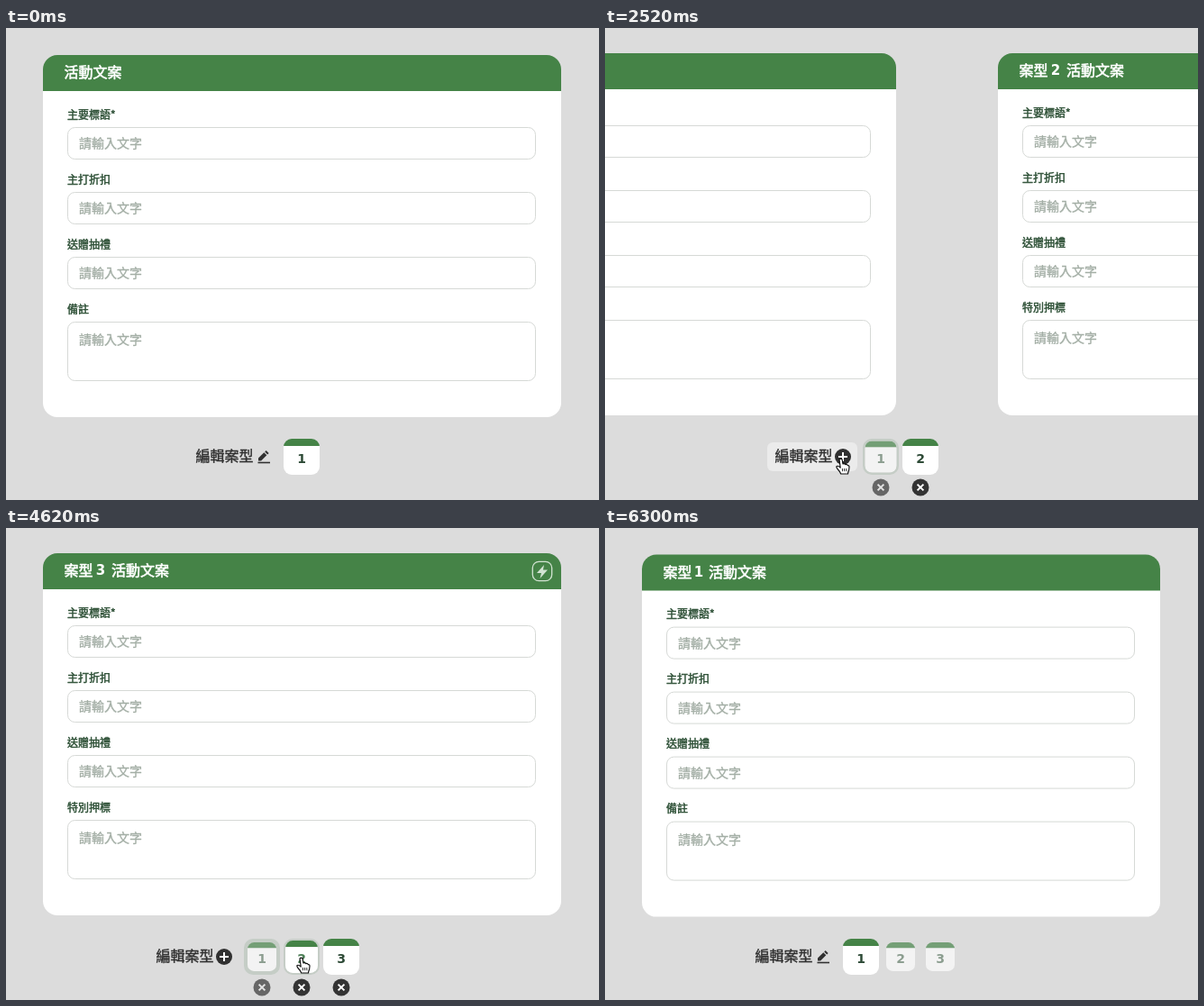
An HTML page with a canvas for the animation above (6370 ms loop, 658x524 px).

```html
<!DOCTYPE html>
<html lang="zh-Hant">
<head>
<meta charset="utf-8">
<title>活動文案</title>
<style>
html, body { margin: 0; width: 100%; height: 100%; overflow: hidden; background: #dcdcdc; }
canvas { display: block; width: 658px; height: 524px; }
</style>
</head>
<body>
<canvas id="stage"></canvas>
<script>
const W = 658, H = 524, LOOP = 6370, STEP = 70;
const BACK = '#dcdcdc', GREEN = '#458347', DARK = '#303030', INK = '#2c4f35';
const CJK = '"Noto Sans CJK TC", "Noto Sans CJK", "Noto Sans CJK JP", sans-serif';
const NUM = '"DejaVu Sans", sans-serif';
const EDIT_ON = 1260, EDIT_OFF = 4680;

const canvas = document.getElementById('stage');
const ctx = canvas.getContext('2d');
const dpr = window.devicePixelRatio || 1;
canvas.width = W * dpr;
canvas.height = H * dpr;

// cubic-bezier(.25, .1, .25, 1)
function ease(x) {
  if (x <= 0) return 0;
  if (x >= 1) return 1;
  const curve = (a, b, u) => 3 * a * u * (1 - u) ** 2 + 3 * b * u * u * (1 - u) + u ** 3;
  let lo = 0, hi = 1;
  for (let i = 0; i < 24; i++) {
    const mid = (lo + hi) / 2;
    if (curve(.25, .25, mid) < x) lo = mid; else hi = mid;
  }
  return curve(.1, 1, lo);
}

// keys: [start, value, duration]
function track(t, first, keys) {
  let v = first;
  for (const [start, to, dur] of keys) {
    if (t >= start) v += (to - v) * ease((t - start) / dur);
  }
  return v;
}

function last(t, first, keys) {
  let v = first;
  for (const [start, to] of keys) if (t >= start) v = to;
  return v;
}

const SLIDE = [[2445, 1, 291], [3565, 2, 291], [4675, 1.0015, 291], [5665, 0, 291]];
const CARD_Y = [[EDIT_ON, 28, 200], [6160, 30, 280]];
const COUNT = [[2450, 2], [3570, 3]];

// tile emphasis: 0 idle, .5 hovered, 1 active
const TILES = [
  [[2450, 0, 200], [5230, .5, 80], [5670, 1, 200]],
  [[3570, 0, 140], [4340, .5, 140], [4680, 1, 200], [5670, 0, 200]],
  [[4680, 0, 200]]
];

const CURSOR = [
  [420, 269, 459, 140], [630, 255, 483, 140], [1400, 262, 479, 420], [3080, 249, 480, 140],
  [3860, 328, 478, 480], [4900, 295, 481, 420], [6020, 298, 491, 210]
];
const CLICKS = [1050, 2240, 3360, 4480, 5460];

function box(x, y, w, h, r) {
  ctx.beginPath();
  ctx.roundRect(x, y, w, h, r);
}

function panel(x, y, w, h, r, color) {
  ctx.fillStyle = color;
  box(x, y, w, h, r);
  ctx.fill();
}

function disc(x, y, r, color) {
  ctx.fillStyle = color;
  ctx.beginPath();
  ctx.arc(x, y, r, 0, 7);
  ctx.fill();
}

function poly(points, color) {
  ctx.fillStyle = color;
  ctx.beginPath();
  points.forEach(p => ctx.lineTo(...p));
  ctx.closePath();
  ctx.fill();
}

function line(x1, y1, x2, y2, width, color) {
  ctx.strokeStyle = color;
  ctx.lineWidth = width;
  ctx.beginPath();
  ctx.moveTo(x1, y1);
  ctx.lineTo(x2, y2);
  ctx.stroke();
}

// y is the middle of the glyphs; a hairline stroke makes a medium weight
function text(str, x, y, size, color, bold = .025) {
  const base = Math.round(y + size * .38);
  ctx.font = `400 ${size}px ${CJK}`;
  ctx.textAlign = 'left';
  ctx.lineJoin = 'round';
  ctx.fillStyle = ctx.strokeStyle = color;
  ctx.lineWidth = size * bold;
  ctx.fillText(str, x, base);
  ctx.strokeText(str, x, base);
}

function digit(n, x, y, size, color) {
  ctx.font = `700 ${size}px ${NUM}`;
  ctx.textAlign = 'center';
  ctx.fillStyle = color;
  ctx.fillText(n, x, Math.round(y + size * .365));
}

function bolt(x, y) {
  ctx.strokeStyle = '#d3e4d3';
  ctx.lineWidth = 1.3;
  box(x - 10.7, y - 10.7, 21.4, 21.4, 7);
  ctx.stroke();
  const shape = [[2, -7], [-6, 2], [-1, 2], [-2.5, 8], [6, -1.5], [1, -1.5]];
  poly(shape.map(([a, b]) => [x + a, y + b]), '#d3e4d3');
}

function card(i, x, y, numbered) {
  if (x > W || x < -580) return;
  panel(x, y + 20, 575, 382, [0, 0, 16, 16], '#fff');
  panel(x, y, 575, 40, [16, 16, 0, 0], GREEN);

  const tx = x + 23.5, ty = y + 19;
  if (numbered) {
    text('案型', tx, ty, 16, '#fff', .04);
    digit(i + 1, tx + (i ? 40.5 : 39.5), ty, 15, '#fff');
    text('活動文案', tx + (i ? 52.5 : 50.5), ty, 16, '#fff', .04);
  } else {
    text('活動文案', tx, ty, 16, '#fff', .04);
  }
  if (i) bolt(x + 554, y + 20);

  const names = ['主要標語*', '主打折扣', '送贈抽禮', i ? '特別押標' : '備註'];
  names.forEach((name, k) => {
    const top = y + 80 + 72 * k, tall = k === 3;
    text(name, x + 27, top - 14, 12, INK, .04);
    ctx.strokeStyle = '#d6d9d6';
    ctx.lineWidth = 1;
    box(x + 27.5, top + .5, 519, tall ? 65 : 35, 8);
    ctx.stroke();
    text('請輸入文字', x + 40, top + (tall ? 20 : 18), 14, '#a3aea5');
  });
}

function pencil(x, y) {
  poly([[x - 6, y + 1.5], [x + .3, y - 4.7], [x + 3.3, y - 1.7], [x - 2.9, y + 4.5], [x - 6, y + 4.5]], DARK);
  poly([[x + 1.2, y - 5.6], [x + 2.6, y - 7], [x + 5.6, y - 4], [x + 4.2, y - 2.6]], DARK);
  line(x - 6.5, y + 6.5, x + 7, y + 6.5, 1.6, DARK);
}

function plus(x, y) {
  disc(x, y, 9, DARK);
  line(x - 5, y, x + 5, y, 2, '#fff');
  line(x, y - 5, x, y + 5, 2, '#fff');
}

function closeMark(x, y, strong, alpha) {
  ctx.globalAlpha = alpha;
  disc(x, y, 9.5, strong ? '#333' : '#666');
  const ink = strong ? '#fff' : '#e4e4e4';
  line(x - 3.4, y - 3.4, x + 3.4, y + 3.4, 2, ink);
  line(x - 3.4, y + 3.4, x + 3.4, y - 3.4, 2, ink);
  ctx.globalAlpha = 1;
}

function tile(i, x, t, edit) {
  const level = track(t, 1, TILES[i]), goal = last(t, 1, TILES[i]);
  const size = 32 + 8 * level, left = x - size / 2, top = 476 - size / 2;
  const cap = size / 5, r = size / 4.4;
  if (edit && level < .99) {
    panel(x - 20, 456, 40, 40, 10, '#c5cdc6');
    panel(left, top, size, size, r, BACK);
  }
  ctx.globalAlpha = goal ? 1 : .68;
  ctx.save();
  box(left, top, size, size, r);
  ctx.clip();
  ctx.fillStyle = GREEN;
  ctx.fillRect(left, top, size, cap);
  ctx.fillStyle = '#fff';
  ctx.fillRect(left, top + cap, size, size - cap);
  ctx.restore();
  digit(i + 1, x, 478, 14, goal === 1 ? '#2d4a36' : goal ? '#4d7f57' : '#5a7460');
  ctx.globalAlpha = 1;
  if (edit) closeMark(x, 510, goal > 0, ease((t - EDIT_ON + STEP) / 210));
}

function bar(t) {
  const n = last(t, 1, COUNT), shift = 22 * (n - 1), x = 211 - shift;
  const edit = t >= EDIT_ON && t < EDIT_OFF;
  if (edit && t < 4000) panel(x - 9, 460, 100, 32, 6, '#ebebeb');
  text('編輯案型', x - .5, 475, 16, DARK);
  (edit ? plus : pencil)(x + 75, 476);
  for (let i = 0; i < n; i++) tile(i, 328 + 44 * i - shift, t, edit);
}

function hand(x, y) {
  ctx.save();
  ctx.translate(x, y - 1);
  ctx.lineJoin = 'round';
  ctx.fillStyle = '#fff';
  ctx.strokeStyle = '#111';
  ctx.lineWidth = 1.2;
  const p = new Path2D('M-2 1.2Q-.6 -.8 1.1 1L2 6Q3.8 5 4.8 6.6Q6.5 5.8 7.2 7.6Q9 7.2 9 9.5' +
    'L8.6 13Q7.6 15 7.5 17L-.3 17Q-1.6 14 -3.6 12Q-5.8 9.6 -4.8 8.5Q-3.2 7.6 -.8 10Z');
  ctx.fill(p);
  ctx.stroke(p);
  for (const k of [1.4, 3.6, 5.8]) line(k, 11, k + .1, 14.2, .9, '#111');
  ctx.restore();
}

function pointer(t) {
  if (t < 420 || t >= 6300) return;
  const x = track(t, 286, CURSOR.map(k => [k[0], k[1], k[3]]));
  const y = track(t, 486, CURSOR.map(k => [k[0], k[2], k[3]]));
  if (CLICKS.some(c => t >= c && t < c + STEP)) disc(x, y, 32, 'rgba(130,130,130,.22)');
  hand(x, y);
}

function draw(t) {
  ctx.setTransform(dpr, 0, 0, dpr, 0, 0);
  ctx.fillStyle = BACK;
  ctx.fillRect(0, 0, W, H);
  const pos = track(t, 0, SLIDE), y = track(t, 30, CARD_Y), n = last(t, 1, COUNT);
  for (let i = 0; i < n; i++) card(i, 41 + Math.round(688 * (i - pos)), y, n > 1);
  bar(t);
  pointer(t);
}

let start;
function tick(now) {
  if (start === undefined) start = now;
  const t = (now - start) % LOOP;
  draw(Math.floor(t / STEP) * STEP);
  requestAnimationFrame(tick);
}
draw(0);
requestAnimationFrame(tick);
</script>
</body>
</html>
```
